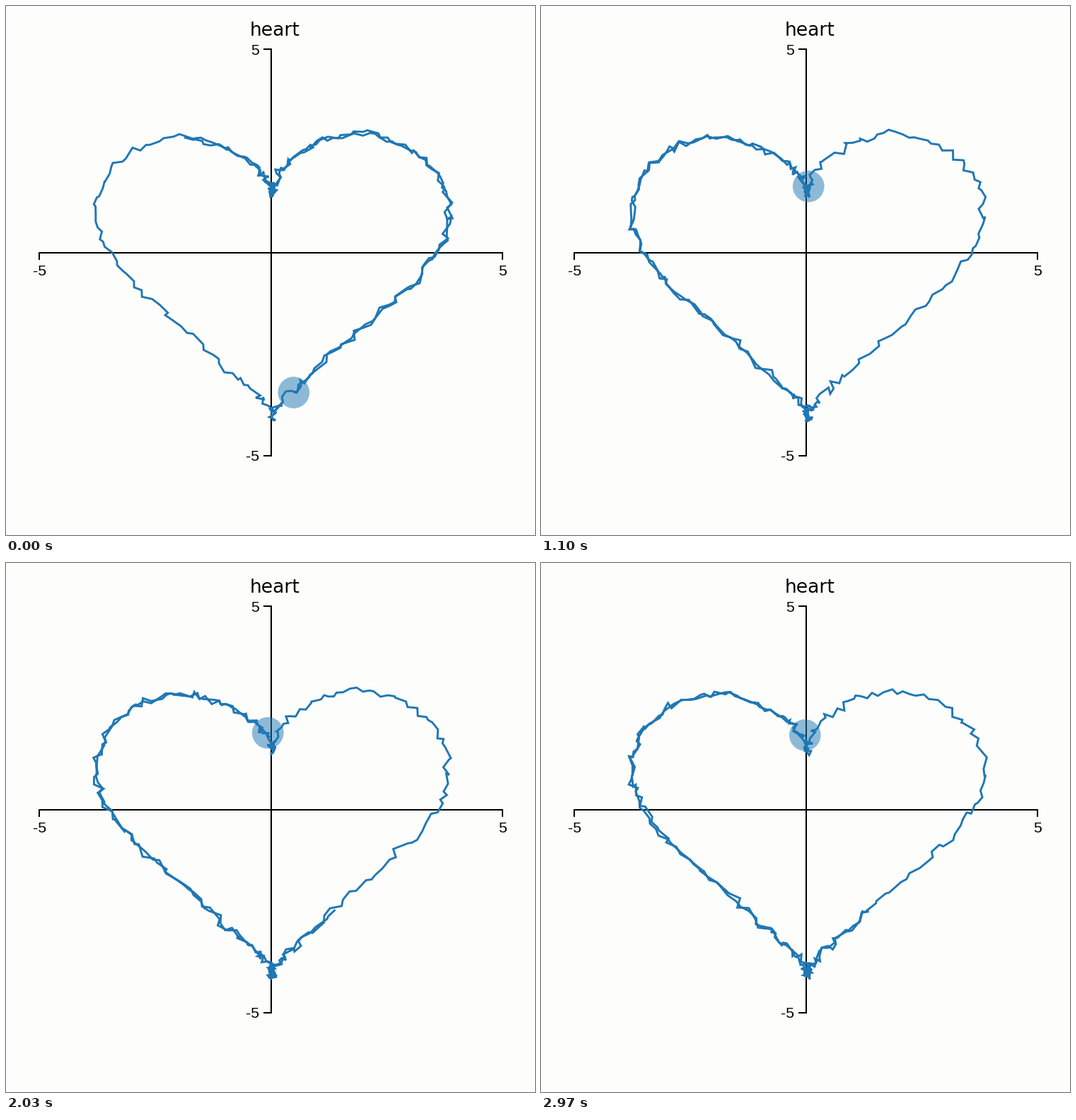
A matplotlib script for the animation above (3.01 s loop, 748x748 px).

```python
import matplotlib.pyplot as plt
import numpy as np
from matplotlib.animation import FuncAnimation

SIZE, DPI = 748, 100
TICKS, TICK_MS = 301, 10
FPS = 30
PT = 72 / DPI
BLUE = "#1f77b4"
TAU = 2 * np.pi
SLOTS = 210      # samples per turn of the curve
TRAIL = 330      # samples kept behind the head

# Head phase in radians (including full turns) at a few times in ms
KEY_MS = [0, 333, 1100, 1667, 2033, 2633, 2967]
KEY_PHASE = [2.65, 10.02, 25.28, 35.99, 43.65, 56.02, 62.50]


def bump(t, center, width):
    gap = (t - center + np.pi) % TAU - np.pi
    return np.exp(-(gap / width) ** 2)


def heart(t):
    """Clockwise heart in pixels; t = 0 is the notch, t = pi the tip."""
    x = 377 + 249 * np.sin(t) ** 3
    y = 347 - 13.8 * (13 * np.cos(t) - 5 * np.cos(2 * t)
                      - 2 * np.cos(3 * t) - np.cos(4 * t))
    y -= 14 * bump(t, 0, 0.5)                                     # notch
    y += 14 * (bump(t, np.pi - 0.65, 0.25) + bump(t, np.pi + 0.65, 0.25))
    y += 8 * bump(t, 5.6, 0.4)                                    # left lobe
    return np.column_stack([x, y])


def build_path(count):
    """Wobbly samples: a wobble tied to the place plus one for each pass."""
    rng = np.random.default_rng(8)
    slot = np.arange(count) - TRAIL
    wobble = rng.uniform(-4, 4, (SLOTS, 2))
    return (heart(slot * TAU / SLOTS) + wobble[slot % SLOTS]
            + rng.uniform(-4, 4, (count, 2)))


def head_at(ms):
    phase = np.interp(ms, KEY_MS, KEY_PHASE)
    return TRAIL + int(round(phase * SLOTS / TAU))


path = build_path(head_at(KEY_MS[-1]) + 1)

fig = plt.figure(figsize=(SIZE / DPI, SIZE / DPI), dpi=DPI, facecolor="#fdfdfb")
ax = fig.add_axes([0, 0, 1, 1])
ax.set(xlim=(0, SIZE), ylim=(SIZE, 0))
ax.axis("off")

for xs, ys in (([47.5, 47.5, 702, 702], [359, 349, 349, 359]),
               ([364, 375, 375, 364], [61, 61, 636, 636])):
    ax.plot(xs, ys, color="black", lw=2 * PT, solid_capstyle="butt",
            solid_joinstyle="miter", zorder=1)


def label(x, y, text, ha, size=21.3, font="Liberation Sans"):
    ax.text(x, y, text, ha=ha, va="baseline", fontsize=size * PT,
            family=font, color="black")


label(47.5, 381, "-5", "center")
label(702, 381, "5", "center")
label(358, 68.5, "5", "right")
label(358, 643, "-5", "right")
label(380, 41.5, "heart", "center", 26.67, "DejaVu Sans")

line, = ax.plot([], [], color=BLUE, lw=2.9 * PT, solid_joinstyle="miter",
                solid_capstyle="butt", zorder=2)
dot = plt.Circle((0, 0), 22.3, color=BLUE, alpha=0.5, lw=0, zorder=3)
ax.add_patch(dot)


def draw(tick):
    # The pose changes 30 times a second, on the nearest 10 ms tick
    step = int((tick * TICK_MS + TICK_MS / 2) * FPS / 1000)
    head = head_at(step * 1000 / FPS)
    line.set_data(*path[head - TRAIL:head + 1].T)
    dot.center = tuple(path[head])
    return line, dot


anim = FuncAnimation(fig, draw, frames=TICKS, interval=TICK_MS,
                     repeat=True, repeat_delay=0)
plt.show()
```
